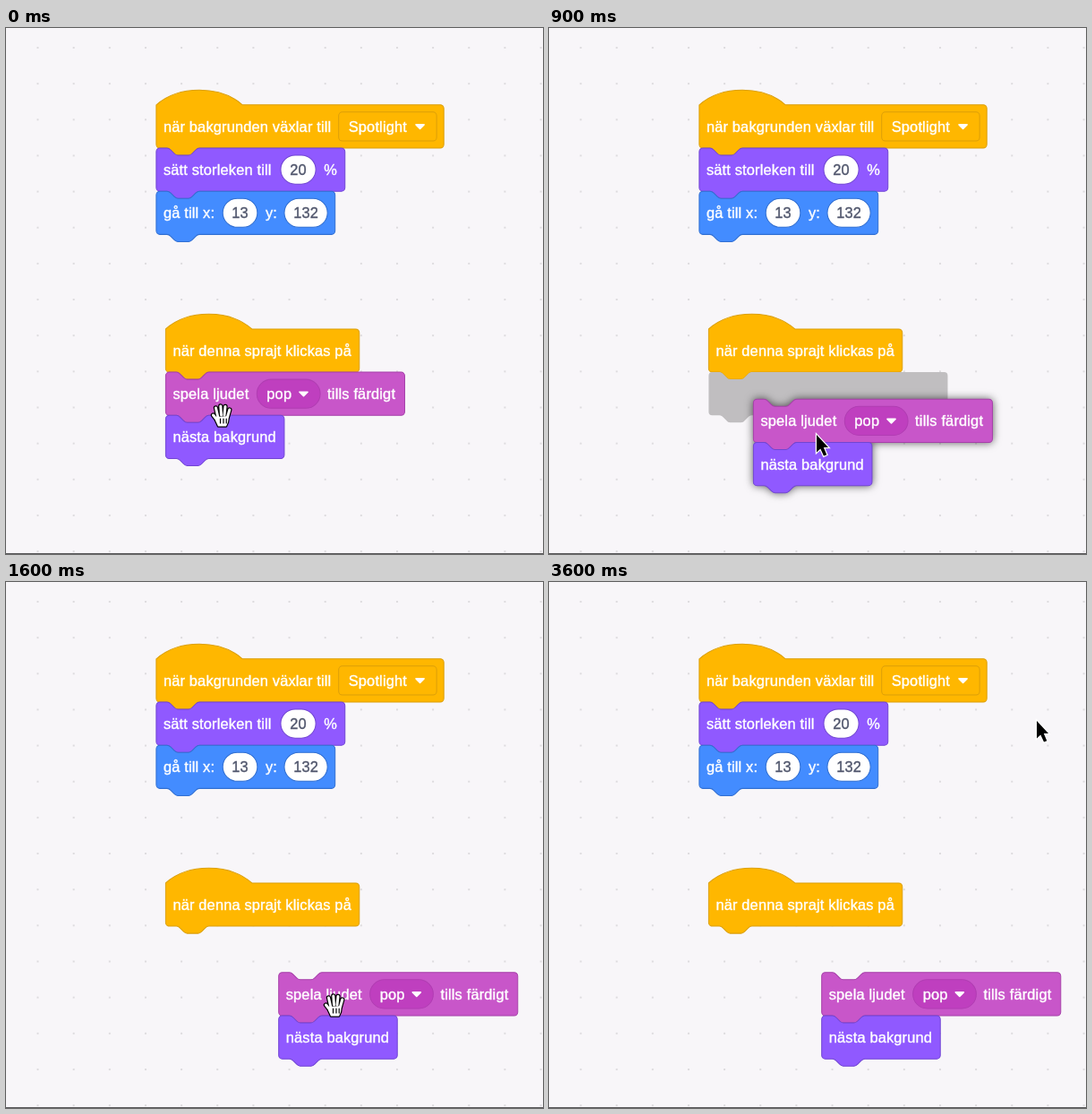
Animation of 600x587 px, one loop 3700 ms. Source, as an HTML page:

```html
<!DOCTYPE html>
<html lang="sv">
<meta charset="utf-8">
<title>Block</title>
<style>
html, body { margin: 0; height: 100%; overflow: hidden; background: #f8f6f9; }
svg { display: block; width: 100vw; height: 100vh; }
text { font: 16.3px "Liberation Sans", Arial, sans-serif; letter-spacing: .18px; fill: #fff; stroke: #fff; stroke-width: .4px; }
.num { fill: #50566c; stroke: #50566c; text-anchor: middle; }
.drag { filter: drop-shadow(0 0 5px rgba(0, 0, 0, .62)); }
.hand { stroke-linecap: round; stroke-linejoin: round; }
</style>
<svg viewBox="0 0 600 587">
  <defs>
    <pattern id="dots" x="34.5" y="21" width="40.15" height="40.15" patternUnits="userSpaceOnUse">
      <rect width="2" height="2" fill="#dddbde"/>
    </pattern>
  </defs>
  <rect width="600" height="587" fill="#f8f6f9"/>
  <rect width="600" height="587" fill="url(#dots)"/>
  <rect y="586" width="600" height="1" fill="#5c5b5d"/>
  <g id="scene"></g>
</svg>
<script>
const YELLOW = ['#ffb700', '#dc9f08'], PURPLE = ['#9059ff', '#7145d3'],
      BLUE = ['#438cff', '#316fd2'], PINK = ['#c856c9', '#a640a9'], GREY = ['#c0bec0', 'none'];
const SCALE = 1.004, HOME = [178.4, 335.9];

const NOTCH = 'H12c2 0 3 1 4 2l4 4c1 1 2 2 4 2h12c2 0 3-1 4-2l4-4c1-1 2-2 4-2';
const TAB = 'H48c-2 0-3 1-4 2l-4 4c-1 1-2 2-4 2h-12c-2 0-3-1-4-2l-4-4c-1-1-2-2-4-2';

function block(row, width, [fill, stroke], content = '', hat = false) {
  const top = hat ? 'M0 0c25-22 71-22 96 0' : 'M0 4a4 4 0 0 1 4-4' + NOTCH;
  const d = `${top}H${width - 4}a4 4 0 0 1 4 4v40a4 4 0 0 1-4 4${TAB}H4a4 4 0 0 1-4-4z`;
  return `<g transform="translate(0 ${row * 48})"><path d="${d}" fill="${fill}" stroke="${stroke}"/>${content}</g>`;
}
const label = (x, s) => `<text x="${x}" y="30">${s}</text>`;
const box = (x, w, r, fill, stroke) =>
  `<rect x="${x}" y="8" width="${w}" height="32" rx="${r}" fill="${fill}" stroke="${stroke}"/>`;
const number = (x, w, n, stroke) =>
  box(x, w, 16, '#fff', stroke) + `<text class="num" x="${x + w / 2}" y="30">${n}</text>`;
const menu = (x, w, r, s, fill, stroke) => box(x, w, r, fill, stroke) + label(x + 11, s) +
  `<path d="M${x + w - 23} 22h9l-4.5 4.5z" fill="#fff" stroke="#fff" stroke-width="1.6" stroke-linejoin="round"/>`;
const at = (x, y, s, attrs = '') => `<g ${attrs} transform="translate(${x} ${y}) scale(${SCALE})">${s}</g>`;

function hand(id, fingers, palm) {
  return `<g id="${id}" class="hand">
    <path d="${fingers}" fill="none" stroke="#000" stroke-width="5.4"/>
    <path d="${palm}" fill="#fff" stroke="#000" stroke-width="2.4"/>
    <path d="${fingers}" fill="none" stroke="#fff" stroke-width="3"/>
    <path d="${palm}" fill="#fff"/>
    <path d="M-1.5 4v5M2 4v5M5.2 4v5" stroke="#000" stroke-width="1.2"/></g>`;
}

const $ = id => document.getElementById(id);
$('scene').innerHTML =
  at(167.9, 85.8,
    block(0, 320, YELLOW, label(8, 'når bakgrunden växlar till'.replace('å', 'ä')) +
      menu(203, 109, 4, 'Spotlight', ...YELLOW), true) +
    block(1, 210, PURPLE, label(8, 'sätt storleken till') + number(138.5, 39, 20, PURPLE[1]) + label(186.5, '%')) +
    block(2, 199, BLUE, label(8, 'gå till x:') + number(74, 38.5, 13, BLUE[1]) +
      label(121.5, 'y:') + number(142.5, 48, 132, BLUE[1]))) +
  at(...HOME, block(0, 215.5, YELLOW, label(8, 'när denna sprajt klickas på'), true)) +
  at(...HOME, block(1, 266, GREY), 'id="ghost"') +
  '<g id="pair">' + at(...HOME,
    block(1, 266, PINK, label(8, 'spela ljudet') + menu(101.5, 70.5, 16, 'pop', '#bf3fbf', '#b13db3') +
      label(180, 'tills färdigt')) +
    block(2, 132, PURPLE, label(8, 'nästa bakgrund'))) + '</g>' +
  '<g id="cursor">' +
  hand('open', 'M-4 3L-6.5-8M-.5 0L-1.2-10M3 0L4-9.5M6.5 2L8.8-6M-4 7L-9.5 0', 'M-6 2L8 1 7 8 5 12.5H-4L-7 6z') +
  hand('fist', 'M-5 2V-4.5M-1.4 0V-6.5M2.4 0V-6.3M6.4 2V-5M-4 5L-7.5 2', 'M-6 1H8L7 6 5 9H-3.5L-6.5 5z') +
  `<path id="arrow" d="M1 2V21.5L5.3 17.5 9 25.6 12.3 24.2 8.8 16H14z" fill="#000" stroke="#fff"
    stroke-width="2.4" paint-order="stroke"/></g>`;

// Keys are [ms, x, y].
const DRAG = [[600, 0, 0], [700, 13, 3.6], [800, 30, 15], [900, 50, 30.2], [1300, 123, 45.2], [1400, 126.3, 51.7]];
const POINTER = [[400, 241, 432], [600, 253, 433], [700, 267, 436], [900, 298, 452], [1300, 368, 462],
                 [1400, 371, 468], [1600, 367, 472], [2100, 367, 472]];
const EXIT = [2100, 2600, 544, 153];

function along(keys, t) {
  const i = keys.findIndex(k => k[0] > t);
  if (i < 1) return (i ? keys[keys.length - 1] : keys[0]).slice(1);
  const [a, b] = [keys[i - 1], keys[i]], p = (t - a[0]) / (b[0] - a[0]);
  return [a[1] + (b[1] - a[1]) * p, a[2] + (b[2] - a[2]) * p];
}
const show = (id, on) => $(id).setAttribute('visibility', on ? 'visible' : 'hidden');
const move = (id, [x, y]) => $(id).setAttribute('transform', `translate(${x} ${y})`);

function draw(now) {
  const t = Math.floor(now % 3700 / 100) * 100; // ten steps a second
  move('pair', along(DRAG, t));
  $('pair').setAttribute('class', t >= 700 && t < 1500 ? 'drag' : '');
  show('ghost', t >= 700 && t < 1000);

  const [start, end, x, y] = EXIT;
  const p = Math.min(1, Math.max(0, (t - start) / (end - start))), e = p * p * (3 - 2 * p);
  const c = along(POINTER, t);
  move('cursor', [c[0] + (x - c[0]) * e, c[1] + (y - c[1]) * e]);
  const shape = t < 500 ? 'open' : t < 900 ? 'fist' : t < 1600 ? 'arrow' : t < 2200 ? 'open' : 'arrow';
  for (const id of ['open', 'fist', 'arrow']) show(id, id === shape);
}
const begin = performance.now();
(function tick() {
  draw(performance.now() - begin);
  requestAnimationFrame(tick);
})();
</script>
</html>
```
